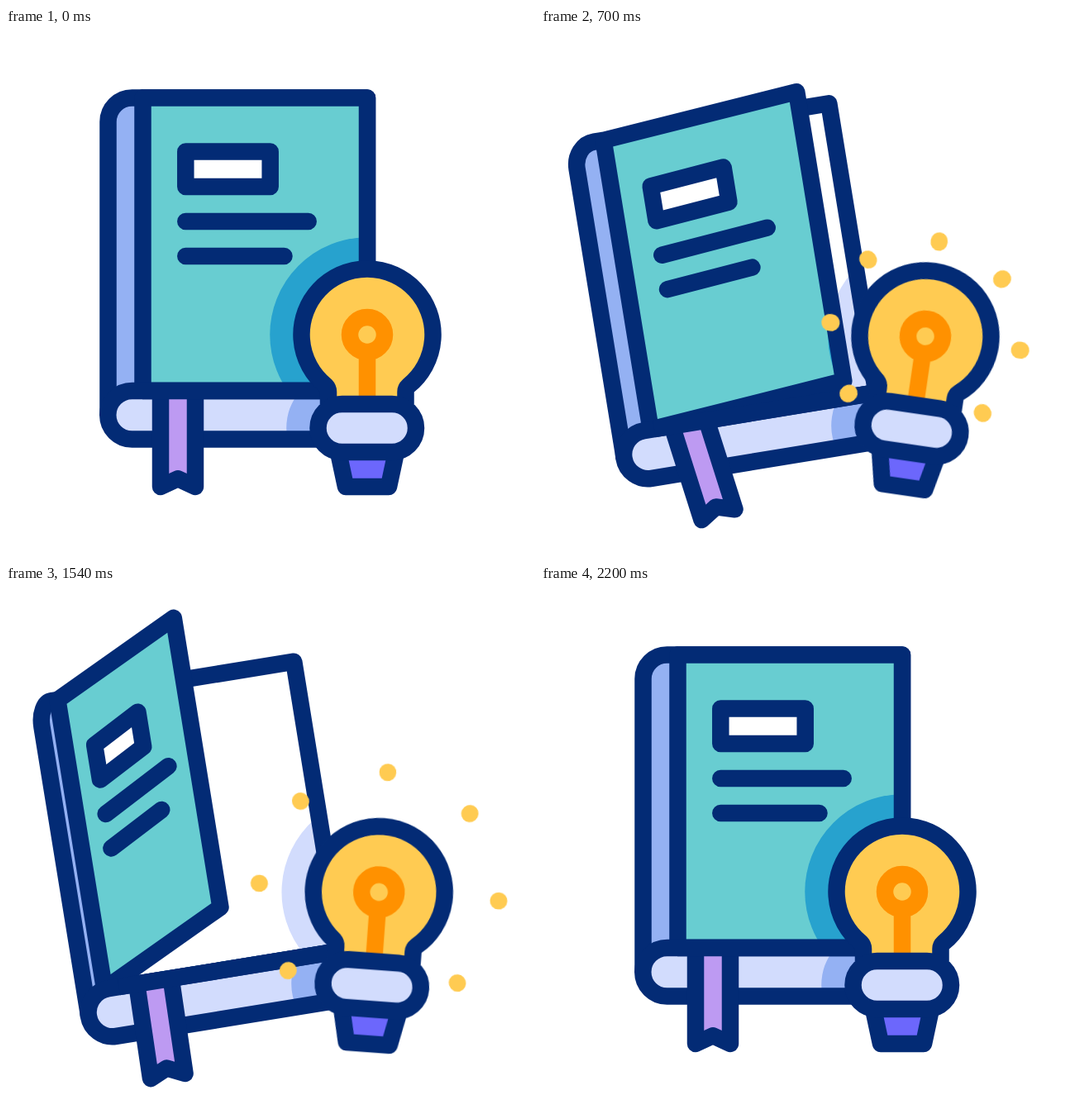
Write an HTML page that moves like this. It is 640 by 640 pixels and loops after 2.4 s.

```html
<!DOCTYPE html>
<html lang="en">
<head>
<meta charset="utf-8">
<title>Book and bulb</title>
<style>
  @property --turn { syntax: "<angle>"; inherits: true; initial-value: 0deg; }
  @property --shift { syntax: "<number>"; inherits: true; initial-value: 0; }
  @property --open { syntax: "<number>"; inherits: true; initial-value: 0; }
  @property --sway { syntax: "<angle>"; inherits: true; initial-value: 0deg; }
  @property --tilt { syntax: "<angle>"; inherits: true; initial-value: 0deg; }
  @property --head { syntax: "<length>"; inherits: true; initial-value: 0px; }
  @property --tail { syntax: "<length>"; inherits: true; initial-value: 0px; }

  html, body { margin: 0; height: 100%; overflow: hidden; background: #fff; }

  svg {
    --ink: #032b75;
    display: block;
    width: 100vw;
    height: 100vh;
    fill: none;
    stroke-width: 20.5px;
    stroke-linejoin: round;
    animation: 2400ms cubic-bezier(.3333, 0, .6667, 1) 200ms infinite both;
    animation-name: turn, shift, open, sway, tilt, head, tail;
  }

  .ink { stroke: var(--ink); }
  .round { stroke-linecap: round; }

  /* Each "un" class undoes its partner, so halos stay with the bulb inside clipped areas. */
  .book, .unbook { transform-origin: 152px 468px; }
  .book { transform: translate(calc(-25px * var(--shift)), calc(51.5px * var(--shift))) rotate(var(--turn)); }
  .unbook { transform: rotate(calc(-1 * var(--turn))) translate(calc(25px * var(--shift)), calc(-51.5px * var(--shift))); }

  /* The spine only narrows; the cover and its labels also slant upwards. */
  .spine, .cover, .uncover { transform-origin: 123.5px 0; }
  .spine { transform: scaleX(calc(1 - .445 * var(--open))); }
  .cover {
    transform: matrix(calc(1 - .445 * var(--open)), calc(-.287 * var(--open)),
      0, 1, 0, calc(12.05 * var(--open)));
  }
  .uncover {
    transform: matrix(calc(1 / (1 - .445 * var(--open))),
      calc(.287 * var(--open) / (1 - .445 * var(--open))), 0, 1, 0, calc(-12.05 * var(--open)));
  }
  .labels {
    transform-origin: 138px 0;
    transform: matrix(calc(1 - .448 * var(--open)), calc(-.313 * var(--open)),
      0, 1, 0, calc(20.7 * var(--open)));
  }
  .spine > path, .cover > path, .labels > path { vector-effect: non-scaling-stroke; }

  .ribbon { transform-origin: 208px 439px; transform: rotate(var(--sway)); }
  .bulb { transform-origin: 437px 565px; transform: rotate(var(--tilt)); }
  .halo { stroke-width: 76.5px; }

  .rays { stroke: #ffcb52; animation: show 2400ms step-end 200ms infinite both; }
  .ray {
    stroke-dasharray: calc(var(--head) - var(--tail)) 99px;
    stroke-dashoffset: calc(-1 * var(--tail));
  }

  @keyframes turn {
    0% { --turn: 0deg; }
    25%, 54.167% { --turn: -10deg; }
    66.667% { --turn: 5.6deg; }
    83.333%, 100% { --turn: 0deg; }
  }
  @keyframes shift {
    0% { --shift: 0; }
    25%, 54.167% { --shift: 1; }
    66.667%, 100% { --shift: 0; }
  }
  @keyframes open {
    0% { --open: 0; }
    62.5% { --open: 1; }
    83.333%, 100% { --open: 0; }
  }
  @keyframes sway {
    0% { --sway: 0deg; }
    25% { --sway: -9deg; }
    33.333% { --sway: 12deg; }
    41.667% { --sway: -6deg; }
    50% { --sway: 2deg; }
    54.167% { --sway: .6deg; }
    66.667% { --sway: 5.4deg; }
    83.333%, 100% { --sway: 0deg; }
  }
  @keyframes tilt {
    0% { --tilt: 0deg; }
    20.833% { --tilt: 8.3deg; }
    41.667% { --tilt: -12deg; }
    62.5% { --tilt: 9.3deg; }
    83.333%, 100% { --tilt: 0deg; }
  }
  @keyframes head {
    0%, 16.667% { --head: 0px; }
    45.833%, 100% { --head: 30.5px; }
  }
  @keyframes tail {
    0%, 29.167% { --tail: 0px; }
    58.333%, 100% { --tail: 30.5px; }
  }
  @keyframes show {
    0% { opacity: 0; }
    16.667% { opacity: 1; }
    58.333%, 100% { opacity: 0; }
  }
</style>
</head>
<body>
<svg viewBox="0 0 640 640">
  <defs>
    <g id="halo">
      <circle cx="437" cy="371" r="79.5"/>
      <rect x="377.5" y="455" width="118.5" height="58" rx="29"/>
    </g>
    <path id="ray" class="ray round" d="M437 256V225.5"/>
    <path id="block" d="M437 439H152.5a29 29 0 0 0 0 58.5H437"/>
    <clipPath id="page-area"><rect x="152" y="84.5" width="285" height="354.5"/></clipPath>
    <clipPath id="block-area"><use href="#block"/></clipPath>
    <clipPath id="cover-area"><rect x="165.5" y="84.5" width="271.5" height="354.5"/></clipPath>
  </defs>

  <g class="book">
    <!-- last page and back cover -->
    <path fill="#fff" d="M165.5 84.5H437V439H165.5z"/>
    <g clip-path="url(#page-area)">
      <g class="unbook"><use href="#halo" class="bulb halo" fill="#d2dcfd" stroke="#d2dcfd"/></g>
    </g>
    <path class="ink" d="M165.5 84.5H437V439H165.5z"/>

    <g class="spine">
      <path fill="#94b1f3" d="M165.5 468V84.5H152.5a29 29 0 0 0-29 29V468z"/>
      <path class="ink" d="M165.5 84.5H152.5a29 29 0 0 0-29 29V468"/>
    </g>

    <!-- front cover -->
    <g class="cover">
      <path fill="#68cdd1" d="M165.5 84.5H437V439H165.5z"/>
      <g clip-path="url(#cover-area)">
        <g class="uncover"><g class="unbook">
          <use href="#halo" class="bulb halo" fill="#27a2ce" stroke="#27a2ce"/>
        </g></g>
      </g>
      <path class="ink" d="M165.5 84.5H437V439H165.5z"/>
    </g>
    <g class="labels">
      <path class="ink" fill="#fff" d="M217.3 149.5H319.7V192H217.3z"/>
      <path class="ink round" d="M217.3 234H365.7M217.3 276H336.5"/>
    </g>

    <!-- page block -->
    <use href="#block" fill="#d2dcfd"/>
    <g clip-path="url(#block-area)">
      <g class="unbook"><use href="#halo" class="bulb halo" fill="#94b1f3" stroke="#94b1f3"/></g>
    </g>
    <use href="#block" class="ink"/>

    <path class="ribbon ink" fill="#bd9af2" d="M187 439V555L208 545.3L229 555V439"/>
    <path class="ink" d="M165 439H437"/>
  </g>

  <g class="bulb">
    <g class="rays">
      <use href="#ray"/>
      <use href="#ray" transform="rotate(45 437 371)"/>
      <use href="#ray" transform="rotate(90 437 371)"/>
      <use href="#ray" transform="rotate(135 437 371)"/>
      <use href="#ray" transform="rotate(225 437 371)"/>
      <use href="#ray" transform="rotate(270 437 371)"/>
      <use href="#ray" transform="rotate(315 437 371)"/>
    </g>
    <path class="ink" fill="#6c67fc" d="M402 513L411 555H463L472 513"/>
    <path fill="#ffcb52" class="ink"
      d="M390 455V440Q390 436 387 432.8A79.5 79.5 0 1 1 487 432.8Q483.5 436 483.5 440V455"/>
    <g stroke="#ff9100">
      <circle cx="437" cy="371" r="21"/>
      <path d="M437 395V450"/>
    </g>
    <rect class="ink" fill="#d2dcfd" x="377.5" y="455" width="118.5" height="58" rx="29"/>
  </g>
</svg>
</body>
</html>
```
